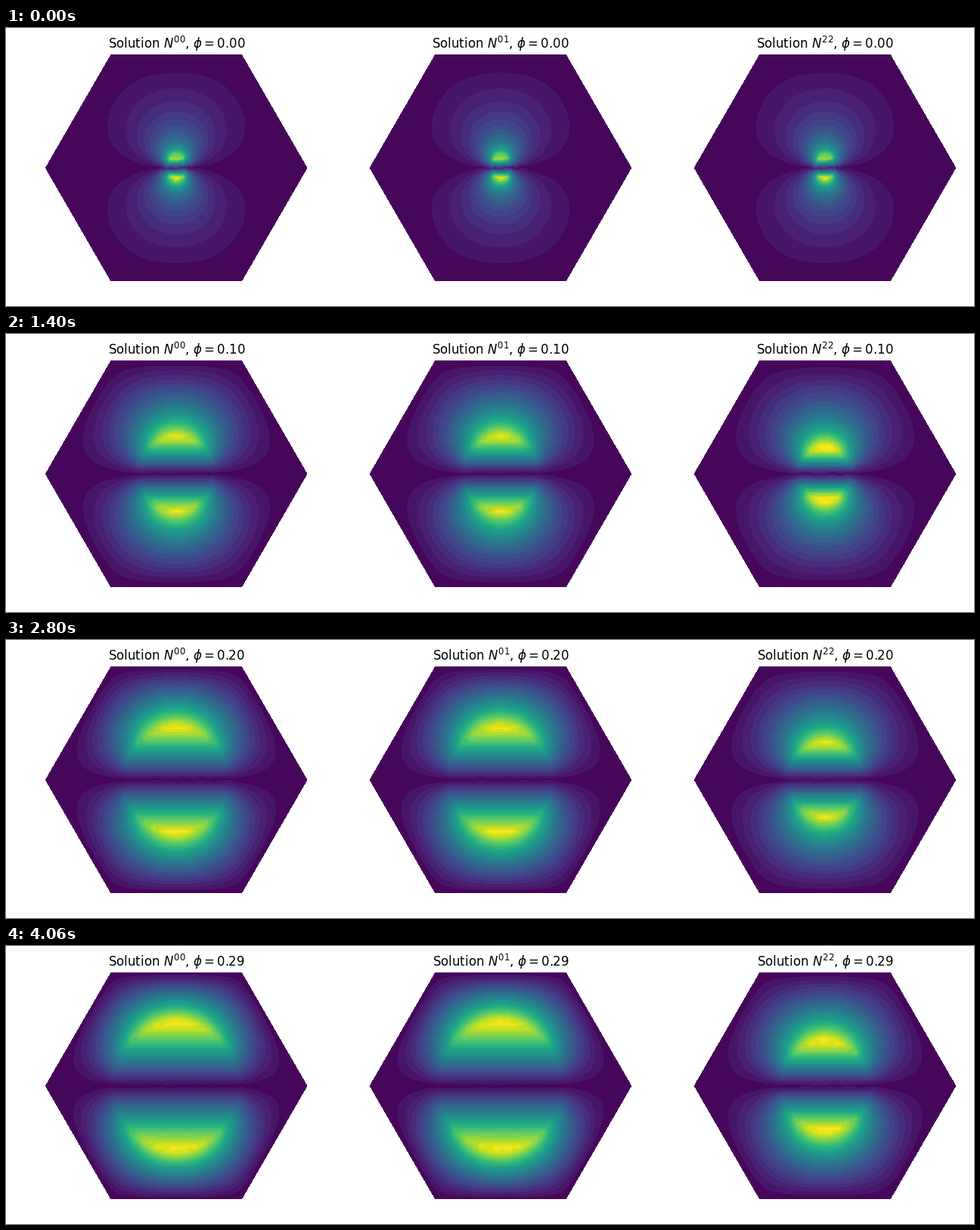
A matplotlib script for the animation above (4200 ms loop, 1280x368 px).

```python
import numpy as np
import matplotlib.pyplot as plt
from matplotlib.animation import FuncAnimation
from matplotlib.tri import Triangulation

WIDTH, HEIGHT, DPI = 1280, 368, 100
FRAMES, INTERVAL = 30, 140
SIDE = 172.6                        # hexagon side in pixels
CENTER_Y = 185.2
CELL_AREA = 1.5 * np.sqrt(3)        # hexagon of unit side
MIN_RADIUS = 0.081                  # smallest disc the mesh resolves
DIVISIONS = 24
BANDS = 27
HARMONICS = (1, 5, 7, 11, 13, 17, 19)

# label, centre x, share of phi taken by the disc
PANELS = (("00", 225.2, 1.0), ("01", 654.0, 1.0), ("22", 1083.0, 0.5))


def hexagon_mesh(n):
    """Triangular lattice in a unit hexagon with lightly perturbed inner nodes."""
    rng = np.random.default_rng(4)
    i, j = np.meshgrid(np.arange(-n, n + 1), np.arange(-n, n + 1))
    keep = np.abs(i + j) <= n
    i, j = i[keep], j[keep]
    ring = np.max(np.abs([i, j, i + j]), axis=0)
    nodes = np.stack([i + j / 2, j * np.sqrt(3) / 2], axis=1)
    nodes += np.where(ring[:, None] < n, rng.uniform(-0.15, 0.15, nodes.shape), 0)
    return nodes.T / n


def harmonics(x, y):
    z = x + 1j * y
    return np.stack([(z ** n).imag for n in HARMONICS], axis=1)


def edge_correction():
    """Harmonic coefficients that cancel a unit dipole on the hexagon's edge."""
    t = np.linspace(0.01, 1, 120)
    x = np.concatenate([1 - t / 2, 0.5 - t / 2])
    y = np.concatenate([t * np.sqrt(3) / 2, np.full(t.size, np.sqrt(3) / 2)])
    return np.linalg.lstsq(harmonics(x, y), y / (x**2 + y**2), rcond=None)[0]


X, Y = hexagon_mesh(DIVISIONS)
BACKGROUND = harmonics(X, Y) @ edge_correction()


def field(phi):
    """Magnitude of the cell solution for a disc of area fraction phi."""
    radius = max(np.sqrt(phi * CELL_AREA / np.pi), MIN_RADIUS)
    return np.abs(Y / np.maximum(X**2 + Y**2, radius**2) - BACKGROUND)


fig = plt.figure(figsize=(WIDTH / DPI, HEIGHT / DPI), dpi=DPI, facecolor="white")
ax = fig.add_axes([0, 0, 1, 1])
ax.set_xlim(0, WIDTH)
ax.set_ylim(HEIGHT, 0)
ax.axis("off")

base = Triangulation(X, Y)
meshes = [Triangulation(cx + SIDE * X, CENTER_Y - SIDE * Y, base.triangles)
          for _, cx, _ in PANELS]
titles = [ax.text(cx + 0.4, 27.3, "", fontsize=12, family="DejaVu Sans",
                  ha="center", va="baseline") for _, cx, _ in PANELS]
contours = []


def update(frame):
    phi = frame / 100
    while contours:
        contours.pop().remove()
    for (label, _, share), mesh, title in zip(PANELS, meshes, titles):
        values = field(share * phi)
        levels = np.linspace(0, values.max() * 1.02, BANDS + 1)
        contours.append(ax.tricontourf(mesh, values, levels=levels, cmap="viridis"))
        title.set_text(rf"Solution $N^{{{label}}}$, $\phi={phi:.2f}$")
    return titles


animation = FuncAnimation(fig, update, frames=FRAMES, interval=INTERVAL,
                          init_func=lambda: titles, repeat=True, repeat_delay=0)
plt.show()
```
